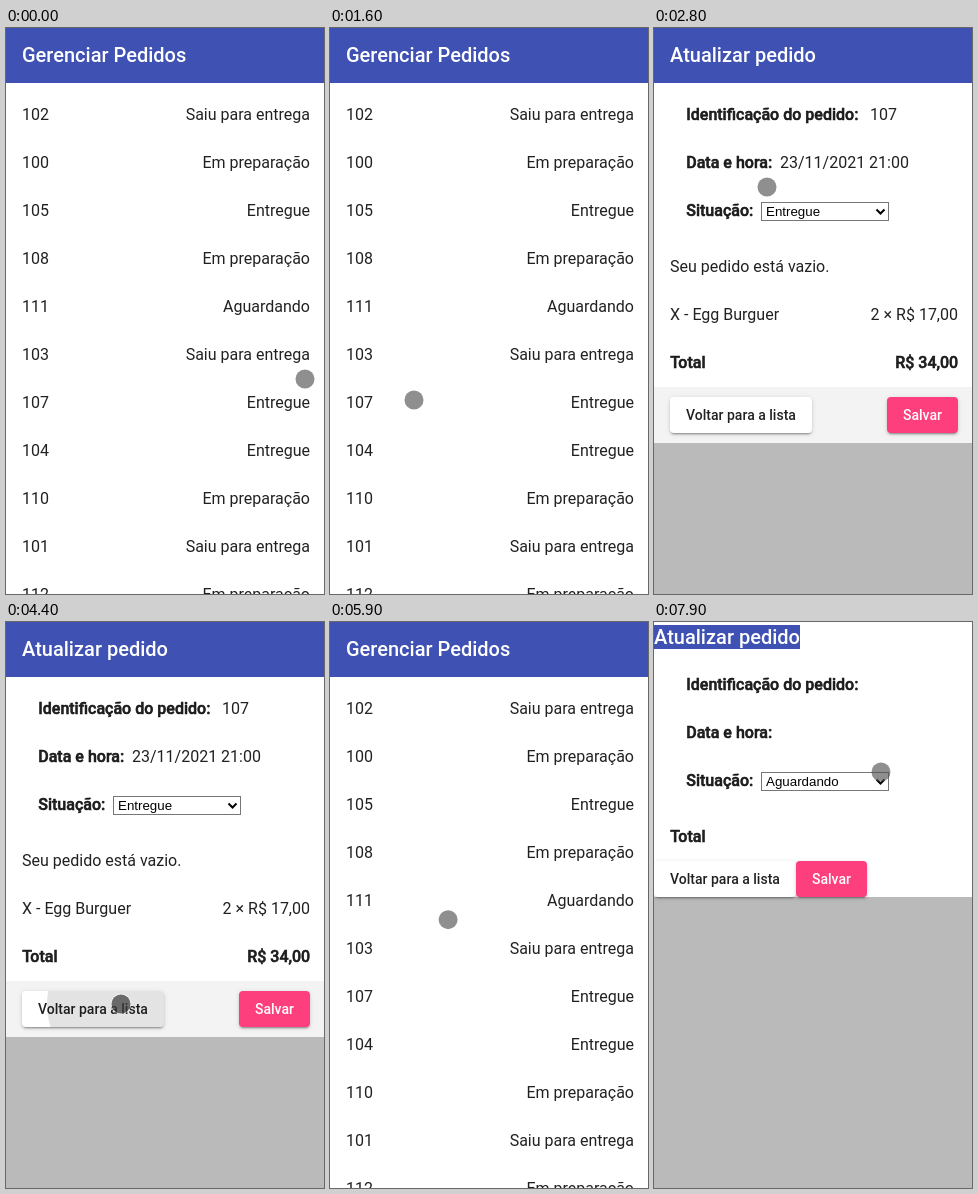
Animation of 318x566 px, one loop 8000 ms. Source, as an HTML page:

```html
<!DOCTYPE html>
<html lang="pt-BR">
<head>
<meta charset="utf-8">
<title>Pedidos</title>
<style>
  html, body { margin: 0; width: 100%; height: 100%; overflow: hidden; background: #fff; }
  #stage {
    position: relative; width: 318px; height: 566px; overflow: hidden;
    background: #fff; color: rgba(0, 0, 0, .87);
    font: 400 16px/24px Roboto, sans-serif;
  }
  #stage * { position: absolute; box-sizing: border-box; white-space: nowrap; }
  .view { inset: 0; visibility: hidden; }
  .view.on { visibility: visible; }
  .bar {
    left: 0; top: 0; width: 318px; height: 55px; padding: 11px 16px 0;
    background: #3f51b2; color: #fff; font-size: 20px; font-weight: 500; line-height: 32px;
  }
  .raw .bar { top: 3px; width: auto; height: 24px; padding: 0; line-height: 24px; }
  .void { left: 0; right: 0; bottom: 0; background: #bababa; }
  .end { right: 14px; }
  /* Synthetic bold grows up and to the right; the tiny turn allows part-pixel baselines. */
  .strong {
    font-weight: 500; -webkit-text-stroke: .55px;
    transform: translate(.25px, -.25px) rotate(.01deg);
  }
  .form { left: 0; top: 0; width: 318px; height: 566px; }
  .raw .form { top: -24px; }
  .select {
    left: 107px; top: 174px; width: 128px; height: 19px; padding-left: 4px;
    border: 1px solid #767676; background: #fff; color: #000;
    font: 13.333px/17px "Liberation Sans", Arial, sans-serif;
  }
  .select svg { left: 113px; top: 5px; }
  .actions { left: 0; top: 359px; width: 318px; height: 56px; background: #f3f3f3; }
  .button {
    top: 10px; height: 36px; padding: 0 16px; border-radius: 4px; background: #fff;
    font-size: 14px; font-weight: 500; line-height: 36px;
    box-shadow: 0 3px 1px -2px rgba(0,0,0,.2), 0 2px 2px rgba(0,0,0,.14), 0 1px 5px rgba(0,0,0,.12);
  }
  .back { left: 16px; width: 142px; overflow: hidden; }
  .save { left: 233px; width: 71px; background: #fe3f7e; color: #fff; }
  .raw .actions { top: 229px; background: none; }
  .raw .back { left: 0; }
  .raw .save { left: 142px; }
  #ripple { left: 98.5px; top: 12.5px; border-radius: 50%; background: rgba(0, 0, 0, .11); transform: translate(-50%, -50%); }
  #cursor {
    left: -9.5px; top: -9.5px; width: 19.5px; height: 19.5px; border-radius: 50%;
    background: rgba(77, 77, 77, .63);
  }
  #cursor.down { background: rgba(60, 60, 60, .72); box-shadow: 0 0 0 1px rgba(255, 255, 255, .5); }
</style>
</head>
<body>
<div id="stage"></div>
<script>
const stage = document.getElementById('stage');

const text = (y, content, x, cls = '') =>
  `<div class="${cls}" style="top:${y - 12}px;${x === undefined ? '' : `left:${x}px`}">${content}</div>`;
const right = (y, content, cls = '') => text(y, content, undefined, 'end ' + cls);
const bar = title => `<div class="bar">${title}</div>`;
const filler = top => `<div class="void" style="top:${top}px"></div>`;
const view = (id, body, cls = '') => `<div class="view ${cls}" id="${id}">${body}</div>`;
const rowY = i => 87 + 48 * i;

const [ready, sent, done, waiting] = ['Em preparação', 'Saiu para entrega', 'Entregue', 'Aguardando'];
const orders = [
  ['102', sent], ['100', ready], ['105', done], ['108', ready], ['111', waiting], ['103', sent],
  ['107', done], ['104', done], ['110', ready], ['101', sent], ['112', ready]
];
const rows = orders.map(([id, status], i) => text(rowY(i), id, 16) + right(rowY(i), status)).join('');

const labels = ['Identificação do pedido:', 'Data e hora:', 'Situação:']
  .map((label, i) => text(rowY(i), label, 32, 'strong')).join('');
const select = value => `<div class="select"><span class="value">${value}</span>
  <svg width="11" height="8"><path d="M1.5 1.5 5.5 5.5 9.5 1.5" fill="none" stroke="#000" stroke-width="2"/></svg></div>`;
const actions = ripple => `<div class="actions">
  <div class="button back">${ripple}<span>Voltar para a lista</span></div>
  <div class="button save"><span>Salvar</span></div></div>`;

stage.innerHTML =
  view('list', bar('Gerenciar Pedidos') + rows) +
  view('empty', bar('Gerenciar Pedidos') + filler(71)) +
  view('loading', bar('Atualizar pedido')
    + `<div class="form">${labels}${select(waiting)}${text(239, 'Total', 16, 'strong')}</div>`
    + filler(275) + actions(''), 'raw') +
  view('detail', bar('Atualizar pedido')
    + `<div class="form">${labels}${select(done)}`
    + text(rowY(0), '107', 216) + text(rowY(1), '23/11/2021 21:00', 126)
    + text(239, 'Seu pedido está vazio.', 16)
    + text(287, 'X - Egg Burguer', 16) + right(287, '2 × R$ 17,00')
    + text(335, 'Total', 16, 'strong') + right(335, 'R$ 34,00', 'strong') + '</div>'
    + filler(415) + actions('<div id="ripple"></div>')) +
  '<div id="cursor"></div>';

const views = [...stage.querySelectorAll('.view')];
const cursor = document.getElementById('cursor');
const ripple = document.getElementById('ripple');
const option = document.querySelector('#loading .value');

const scenes = [
  { at: 0, id: 'list' }, { at: 2200, id: 'loading' }, { at: 2400, id: 'detail' },
  { at: 4600, id: 'empty' }, { at: 4700, id: 'list' }, { at: 7800, id: 'loading' }
];

// Each move swings from the last resting point to `to`, pulled towards `bend`.
const home = [298.5, 350.5];
const moves = [
  { from: 200, till: 1100, bend: [120, -34], to: [120, 386] },
  { from: 1100, till: 1600, bend: [150, 410], to: [83.5, 371.5] },
  { from: 2400, till: 2800, bend: [37, 315], to: [112.5, 158.5] },
  { from: 2800, till: 3500, bend: [265, -8], to: [122.5, 360.5] },
  { from: 3600, till: 4000, bend: [114, 374], to: [114.5, 381.5] },
  { from: 5300, till: 6300, bend: [52, 310], to: [206.5, 242.5] },
  { from: 6600, till: 7000, bend: [225, 218], to: [242.5, 194.5] },
  { from: 7400, till: 7600, bend: [216.5, 89], to: [226.5, 149.5] }
];

const clamp = k => Math.min(1, Math.max(0, k));

function cursorAt(t) {
  return moves.reduce((point, { from, till, bend, to }) => {
    const k = clamp((t - from) / (till - from));
    return point.map((p, i) => (1 - k) ** 2 * p + 2 * k * (1 - k) * bend[i] + k * k * to[i]);
  }, home);
}

function draw(now) {
  const t = Math.floor(now % 8000 / 100) * 100;
  const scene = scenes.filter(s => s.at <= t).pop();
  views.forEach(v => v.classList.toggle('on', v.id === scene.id));
  option.textContent = t > scene.at ? waiting : '';

  const pressed = t >= 4300 && t < 4600;
  const size = pressed ? 148 * Math.min(1, (t - 4200) / 200) : 0;
  ripple.style.width = ripple.style.height = size + 'px';
  cursor.classList.toggle('down', pressed);
  const [x, y] = cursorAt(t);
  cursor.style.transform = `translate(${x}px, ${y}px)`;
}

const start = performance.now();
function tick() {
  draw(performance.now() - start);
  requestAnimationFrame(tick);
}
tick();
</script>
</body>
</html>
```
